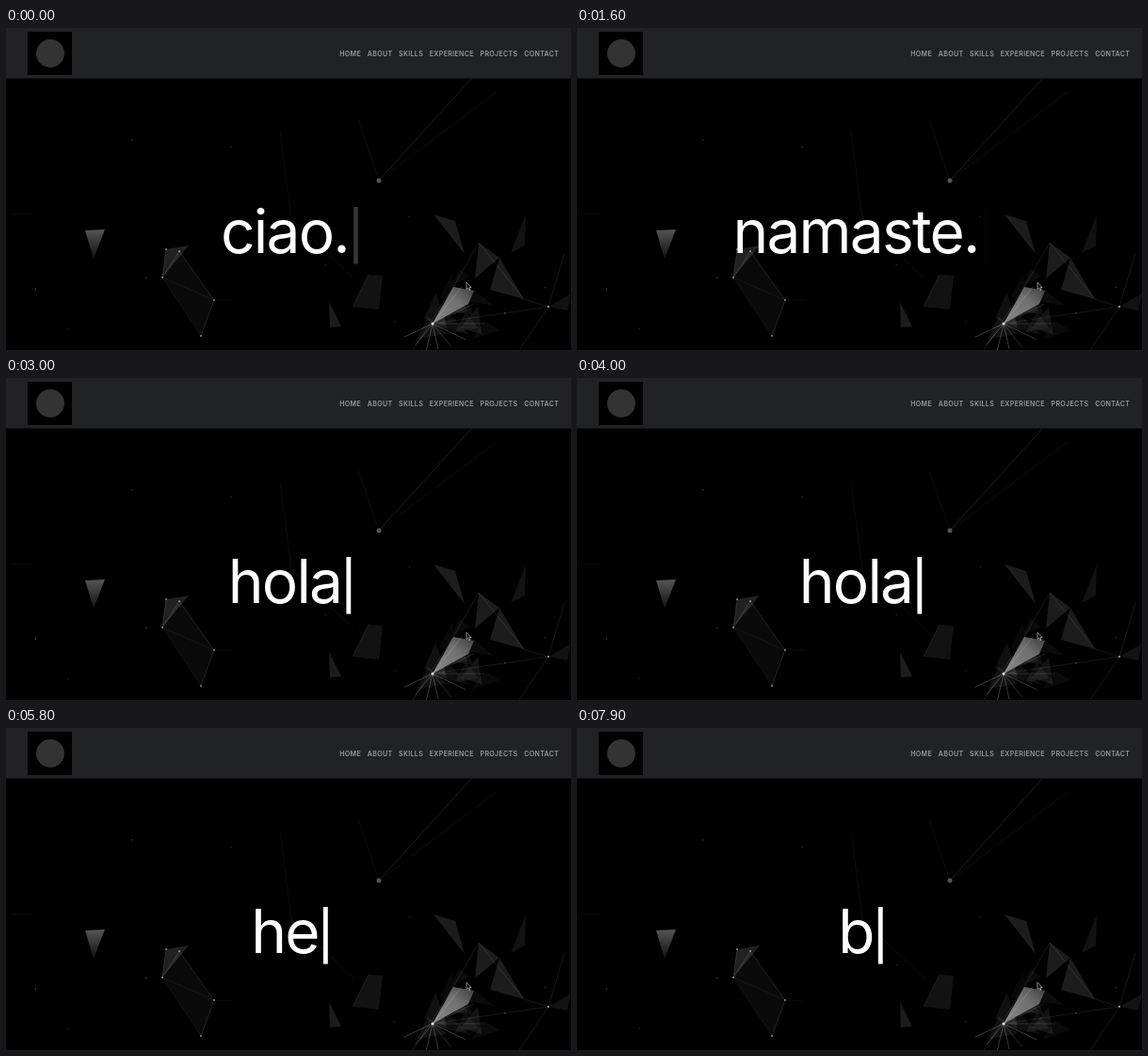
Write an HTML page that moves like this. It is 600x342 px and loops after 8000 ms.

```html
<!DOCTYPE html>
<html lang="en">
<head>
<meta charset="utf-8">
<title>Greetings</title>
<style>
  html, body { margin: 0; width: 100%; height: 100%; overflow: hidden; background: #000; }
  svg { display: block; width: 100vw; height: 100vh; }
  text { font-family: Inter, "Liberation Sans", sans-serif; font-optical-sizing: none; }
  #nav { font-size: 7.1px; font-weight: 600; letter-spacing: .3px; word-spacing: 4.6px; text-anchor: end; fill: #97989a; }
  #word { font-size: 64px; letter-spacing: -1.8px; fill: #fff; }
  #rays { fill: none; stroke: #fff; stroke-width: .6; }
</style>
</head>
<body>
<svg viewBox="0 0 600 342" preserveAspectRatio="none">
  <defs>
    <linearGradient id="fade" x1="0" y1="0" x2="0" y2="1">
      <stop offset="0" stop-color="#555"/>
      <stop offset="1" stop-color="#111"/>
    </linearGradient>
    <linearGradient id="beam" x1="1" y1="0" x2="0" y2="1">
      <stop offset="0" stop-color="#3c3c3c"/>
      <stop offset=".4" stop-color="#707070"/>
      <stop offset="1" stop-color="#888"/>
    </linearGradient>
  </defs>
  <rect width="600" height="342"/>

  <g id="shards" fill="#fff">
    <path opacity=".11" d="M454 198L477 205 487 240ZM502 228L524 244 498 266ZM524 244L550 288 514 278ZM343 291L356 317 344 318Z"/>
    <path opacity=".07" d="M552 198L536 239 551 231ZM385 262L400 263 396 299 368 296ZM576 296L600 282 596 300Z"/>
    <path opacity=".04" d="M166 265L184 237 221 289 207 327Z"/>
    <path opacity=".13" d="M170 235L194 231 166 265Z"/>
  </g>
  <path fill="url(#fade)" d="M84 215L105 214 93 245Z"/>
  <path fill="url(#beam)" d="M475 275L497 279 491 293 453 314Z"/>

  <g id="rays">
    <path opacity=".2" d="M396 162L494 54M170 235L166 265 184 237 221 289 207 327"/>
    <path opacity=".09" d="M374 97L396 162 521 68M291 110L303 203 370 267M5 198H28M166 265L207 327M166 265L221 289H240"/>
    <path opacity=".16" d="M453 314L576 296 593 239M502 228L475 275 432 342M502 228L550 288 576 296 545 342M385 262L368 296"/>
  </g>
  <circle cx="396" cy="162" r="2.5" fill="#555"/>
  <g id="dots" fill="#fff"></g>

  <!-- header -->
  <rect width="600" height="53.5" fill="#202226"/>
  <rect x="23" y="4" width="47" height="46"/>
  <circle cx="47" cy="27" r="15" fill="#333"/>
  <text id="nav" x="587.2" y="29.7">HOME ABOUT SKILLS EXPERIENCE PROJECTS CONTACT</text>

  <text id="word" y="239.2"></text>
  <rect id="caret" y="190" width="4.8" height="60.6" fill="#fff"/>
  <path d="M489 270.3V277.6L490.7 276.1 491.9 278.6 493 278.1 491.9 275.6H494Z" fill="#000" stroke="#ccc" stroke-width=".7"/>
</svg>
<script>
const $ = id => document.getElementById(id);

let seed = 7;
const rand = (lo, hi) => {
  seed = seed * 16807 % 2147483647;
  return lo + (hi - lo) * seed / 2147483647;
};

const add = (parent, tag, attrs) => {
  const el = document.createElementNS('http://www.w3.org/2000/svg', tag);
  for (const k in attrs) el.setAttribute(k, attrs[k]);
  $(parent).append(el);
};

const polar = (x, y, r, a) => [x + r * Math.cos(a), y + r * Math.sin(a)];

// faint haze of overlapping triangles behind the bright corner
for (let i = 0; i < 12; i++) {
  const [x, y] = polar(478, 298, rand(0, 38), rand(0, 2 * Math.PI));
  const tip = k => polar(x, y, rand(8, 24), k * 2.1 + rand(0, 1));
  add('shards', 'path', { d: `M${tip(0)}L${tip(1)} ${tip(2)}Z`, opacity: rand(.03, .08) });
}

// rays fanning out of the bright node
for (let a = -.9; a < 2.8; a += .45) {
  add('rays', 'path', { d: `M453 314L${polar(453, 314, rand(28, 58), a)}`, opacity: rand(.15, .4) });
}

// bright joints, then loose specks
for (const point of $('rays').firstElementChild.getAttribute('d').match(/\d+ \d+/g).slice(2)) {
  const [cx, cy] = point.split(' ');
  add('dots', 'circle', { cx, cy, r: 1, opacity: .5 });
}
add('dots', 'circle', { cx: 453, cy: 314, r: 1.5, opacity: .9 });
add('dots', 'circle', { cx: 576, cy: 296, r: 1.1, opacity: .6 });
for (let i = 0; i < 10; i++) {
  add('dots', 'circle', { cx: rand(0, 600), cy: rand(60, 342), r: .7, opacity: rand(.15, .4) });
}

const LOOP = 8000, TICK = 100, HOLD = 900, ERASE = 60, BLINK = 700;
const WORDS = [['ciao.', -300], ['namaste.', 1260], ['hola.', 3050], ['hello.', 4710], ['bonjour.', 6600]]
  .map(([word, full]) => ({ word, full, erase: full + HOLD, gone: full + HOLD + word.length * ERASE }));

// the caret dips once per blink while a finished word is held
function blink(t) {
  const u = Math.min(1, Math.abs(t % BLINK - BLINK / 2) / 170);
  return u * u * (3 - 2 * u);
}

// each word is typed in the time between the last erasure and its own full time
function stateAt(t) {
  const i = WORDS.findIndex((w, k) => t < w.gone || k === WORDS.length - 1);
  const { word, full, erase } = WORDS[i];
  const start = i ? WORDS[i - 1].gone : full;
  let n = word.length, alpha = 1;
  if (t < full) n = Math.floor(n * (t - start) / (full - start));
  else if (t < erase) alpha = blink(t - full);
  else n = Math.max(0, n - 1 - Math.floor((t - erase) / ERASE));
  return [word.slice(0, n), alpha];
}

const word = $('word'), caret = $('caret');

function draw(now) {
  const [text, alpha] = stateAt(Math.floor(now % LOOP / TICK) * TICK);
  word.textContent = text;
  const w = text ? word.getComputedTextLength() : 0;
  const x = 302.5 - (w + 13) / 2;
  word.setAttribute('x', x);
  caret.setAttribute('x', x + w + 5.2);
  caret.setAttribute('opacity', alpha);
}

const t0 = performance.now();
function frame() {
  draw(performance.now() - t0);
  requestAnimationFrame(frame);
}
frame();
</script>
</body>
</html>
```
